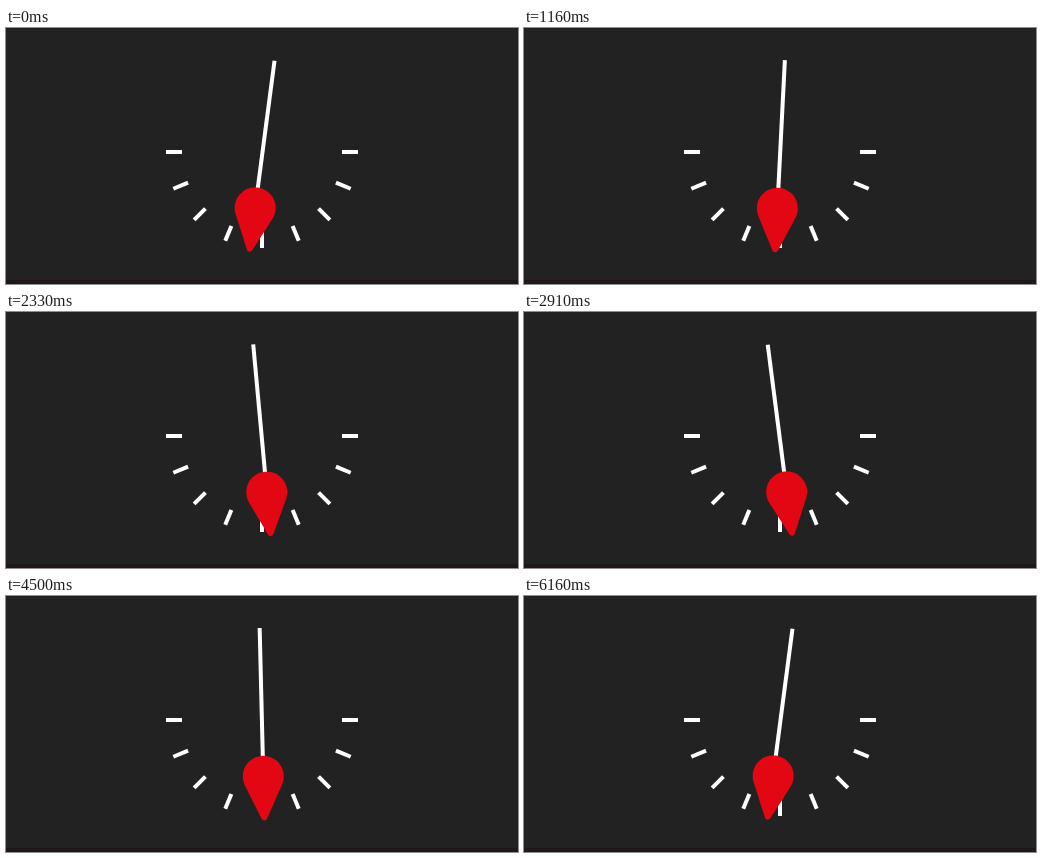
These frames come from a looping animation (512x256 px, 6250 ms). An HTML page:

```html
<!DOCTYPE html>
<html lang="en">
<head>
<meta charset="utf-8">
<title>Pendulum</title>
<style>
  html, body { margin: 0; width: 100%; height: 100%; overflow: hidden; background: #222; }
  svg { display: block; width: 512px; height: 256px; }
</style>
</head>
<body>
<svg viewBox="0 0 512 256">
  <rect width="512" height="256" fill="#222"/>
  <rect y="252" width="512" height="4" fill="#1f171a"/>
  <g id="ticks" stroke="#fff" stroke-width="4"></g>
  <g id="pendulum">
    <path d="M0-96V50" stroke="#fff" stroke-width="4"/>
    <path d="M-18.5 61.2A20.5 20.5 0 1 1 18.5 61.2L2.7 94.8A3 3 0 0 1-2.7 94.8Z" fill="#e30613"/>
  </g>
</svg>
<script>
  const LOOP = 6250, FPS = 12, SWING = 7.5;
  const ticks = document.getElementById('ticks');
  const pendulum = document.getElementById('pendulum');

  for (let angle = 0; angle <= 180; angle += 22.5) {
    const tick = document.createElementNS('http://www.w3.org/2000/svg', 'path');
    tick.setAttribute('d', 'M80 0H96');
    tick.setAttribute('transform', `translate(256 124) rotate(${angle})`);
    ticks.append(tick);
  }

  function draw() {
    // Steps start on whole hundredths of a second, rounded down.
    const time = Math.floor(performance.now() % LOOP / 10) * 10;
    const step = Math.floor((time + 7) * FPS / 1000);
    const phase = step * 1000 / FPS / LOOP;
    const angle = SWING * Math.cos(2 * Math.PI * phase);
    pendulum.setAttribute('transform', `translate(256 128) rotate(${angle})`);
    requestAnimationFrame(draw);
  }
  draw();
</script>
</body>
</html>
```
